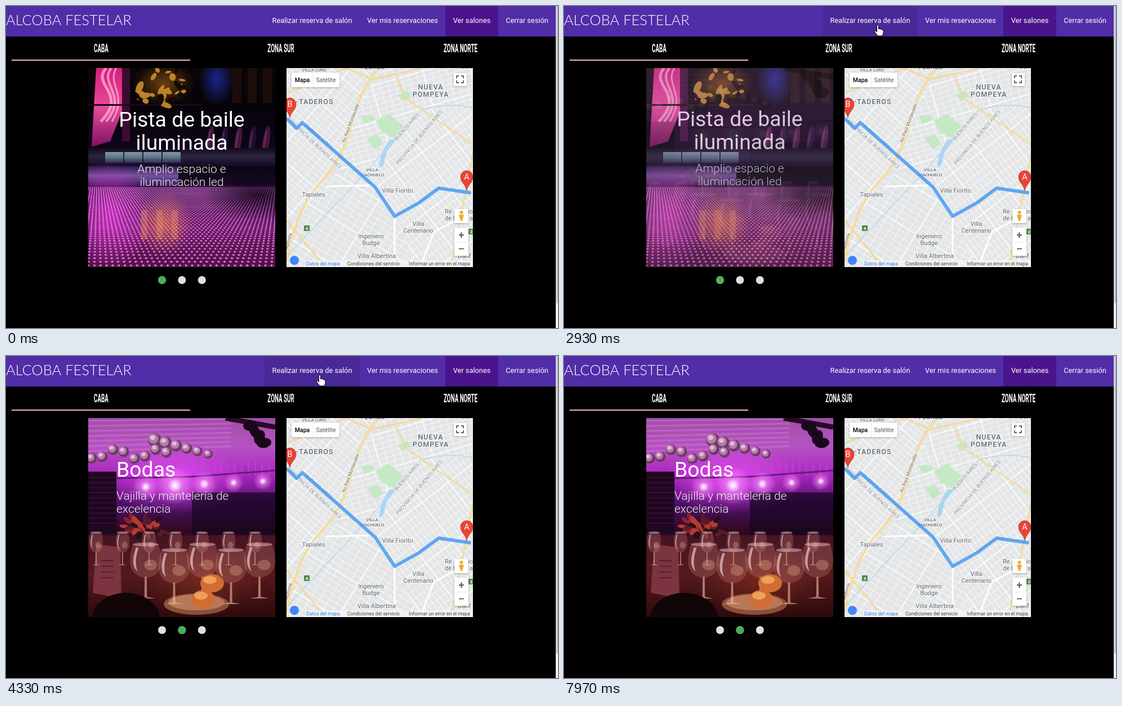
Animation, 980 px wide and 571 px high, one loop 8000 ms. Source, as an HTML page with a canvas:

```html
<!DOCTYPE html>
<html lang="es">
<head>
<meta charset="utf-8">
<title>Salones</title>
<style>
  html, body { margin: 0; width: 100%; height: 100%; overflow: hidden; background: #000; }
  canvas { display: block; }
</style>
</head>
<body>
<canvas id="stage" width="980" height="571"></canvas>
<script>
const W = 980, H = 571, LOOP = 8000;
const ctx = document.getElementById('stage').getContext('2d');
const SLIDE = [146, 110, 332, 353], MAP = [498, 110, 331, 353];
const SWAP = 2898, CAPTION_IN = 3315, FADE = 500;

const clamp = v => Math.max(0, Math.min(1, v));
const lerp = (a, b, p) => a + (b - a) * p;
const outQuad = p => 1 - (1 - p) * (1 - p);
const swing = p => 0.5 - Math.cos(p * Math.PI) / 2;
const roboto = (size, weight = 400) => `${weight} ${size}px Roboto, sans-serif`;
const times = (n, fn) => { for (let i = 0; i < n; i++) fn(i); };
const randomizer = seed => () => (seed = (seed * 16807) % 2147483647) / 2147483647;

// ---- drawing helpers ----
function layer(box, paint) {
  const c = document.createElement('canvas');
  c.width = W; c.height = H;
  const g = c.getContext('2d');
  clipTo(g, box);
  paint(g);
  return c;
}
function clipTo(g, box) { g.beginPath(); g.rect(...box); g.clip(); }
function rect(g, x, y, w, h, color) { g.fillStyle = color; g.fillRect(x, y, w, h); }
function oval(g, x, y, rx, ry, color, turn = 0) {
  g.fillStyle = color;
  g.beginPath(); g.ellipse(x, y, rx, ry, turn, 0, 7); g.fill();
}
function fill(g, path, color) { g.fillStyle = color; g.fill(new Path2D(path)); }
function stroke(g, path, color, width = 1) {
  g.strokeStyle = color; g.lineWidth = width; g.stroke(new Path2D(path));
}
function fade(g, y0, y1, ...colors) {
  const f = g.createLinearGradient(0, y0, 0, y1);
  colors.forEach((c, i) => f.addColorStop(i / (colors.length - 1), c));
  return f;
}
function glow(g, x, y, r, rgb, alpha, squash = 1) {
  g.save();
  g.translate(x, y); g.scale(1, squash);
  const f = g.createRadialGradient(0, 0, 0, 0, 0, r);
  f.addColorStop(0, `rgba(${rgb},${alpha})`);
  f.addColorStop(1, `rgba(${rgb},0)`);
  rect(g, -r, -r, 2 * r, 2 * r, f);
  g.restore();
}
function text(g, str, x, y, font, color, align = 'left') {
  g.font = font; g.fillStyle = color; g.textAlign = align;
  g.fillText(str, x, y);
}

// ---- slide 1: lit dance floor ----
const danceFloor = layer(SLIDE, g => {
  const rnd = randomizer(77);
  rect(g, ...SLIDE, fade(g, 110, 463, '#0c0407', '#06030a', '#0e0518', '#3a0f4c', '#6d1a6c', '#55104a'));
  glow(g, 374, 130, 32, '30,45,170', 0.8, 1.5);
  times(3, i => rect(g, 402 + i * 27, 110, 16, 62, '#1c0d0a'));

  // pink curtain
  fill(g, 'M160 110H206L208 182 185 240 152 250Z', fade(g, 110, 250, '#d61d80', '#ea4a9a', '#7a1260'));
  times(3, i => stroke(g, `M${178 + i * 9} 110C${150 + i * 14} 140 218 155 ${168 + i * 10} 205`, 'rgba(255,190,215,.7)', 5 - i));
  rect(g, 206, 110, 14, 130, '#3a0d30');
  rect(g, 146, 174, 200, 3, '#1e0a12');

  // golden balcony
  glow(g, 280, 138, 55, '170,105,15', 0.6, 0.7);
  times(34, i => oval(g, 234 + rnd() * 94, 112 + rnd() * 64, 3 + rnd() * 8, 2 + rnd() * 4, i % 3 ? '#bb8228' : '#160a04', rnd() * 3));

  // figures behind the benches
  times(5, i => {
    oval(g, 362 + i * 25, 240, 6, 28, i % 2 ? '#1d1030' : '#40183a', 0.15);
    oval(g, 360 + i * 25, 236, 2, 18, 'rgba(150,60,130,.4)', 0.15);
  });

  // benches and their reflections
  rect(g, 146, 252, 332, 30, fade(g, 252, 282, '#120a1c', '#2c2440', '#150c24'));
  times(4, i => rect(g, 176 + i * 34, 259, 32, 19, fade(g, 259, 278, '#7f9ca4', '#5d7388', '#2c3050')));
  rect(g, 146, 284, 160, 34, fade(g, 284, 318, '#2a1a48', '#74539c', '#3a1a56'));
  rect(g, 306, 284, 172, 34, fade(g, 284, 318, '#0a0512', '#1c0c28'));
  glow(g, 185, 370, 75, '225,50,215', 0.75, 1.3);
  glow(g, 280, 385, 50, '230,120,45', 0.7, 1.1);
  times(3, i => rect(g, 240 + i * 27, 362, 11, 52, 'rgba(225,135,70,.4)'));

  // perspective grid of lamps
  for (let z = 0.98, row = 0; z < 3.1; z += 0.034, row++) {
    const gap = 11 / z, y = 254 + 209 / z, shift = 325 + (row % 2) * gap / 2;
    for (let x = shift - Math.floor(190 / gap) * gap; x < 480; x += gap)
      oval(g, x, y, 2.4 / z, 1.8 / z, 'rgba(246,150,228,.78)');
  }
  glow(g, 445, 335, 95, '14,2,20', 0.75, 0.5);
});

// ---- slide 2: wedding tables ----
function discoBall(g, x, y, r) {
  oval(g, x, y, r, r, '#6d3a66');
  oval(g, x - r * 0.2, y - r * 0.2, r * 0.75, r * 0.75, '#b27ba8');
  oval(g, x - r * 0.3, y - r * 0.35, r * 0.4, r * 0.35, '#e8b9dc');
}
function glass(g, x, y, w, h) {
  g.save();
  g.translate(x, y); g.scale(w, h);
  fill(g, 'M-.4 0C-.6 .4-.45 .58 0 .62 .45 .58 .6 .4 .4 0Z', 'rgba(215,140,130,.25)');
  fill(g, 'M-.3 .06C-.44 .3-.4 .42-.25 .5-.35 .36-.3 .2-.22 .06Z', 'rgba(255,225,225,.6)');
  fill(g, 'M-.03 .6H.03L.04 .97 .3 1-.3 1-.04 .97Z', 'rgba(240,185,165,.6)');
  oval(g, 0, 0, 0.4, 0.035, 'rgba(250,205,205,.45)');
  oval(g, 0.15, 0.38, 0.2, 0.1, 'rgba(245,185,155,.3)');
  g.restore();
}
const wedding = layer(SLIDE, g => {
  const rnd = randomizer(31);
  rect(g, ...SLIDE, fade(g, 110, 463, '#a04da6', '#b653c2', '#ab25c0', '#4c0f68', '#30091f', '#451418', '#3a0f10', '#220808'));
  times(7, i => stroke(g, `M146 ${115 + i * 9}L400 ${112 + i * 8}`, 'rgba(225,150,220,.3)', 3));
  glow(g, 300, 218, 125, '240,80,255', 0.8, 0.5);
  rect(g, 146, 205, 50, 110, '#1f0720');
  times(10, i => rect(g, 147, 215 + i * 9, 48, 1, '#45183f'));
  rect(g, 330, 242, 148, 75, 'rgba(22,5,30,.7)');
  times(11, i => rect(g, 345 + i * 12, 188, 3, 24, 'rgba(185,75,215,.5)'));
  stroke(g, 'M196 217L330 214 478 203', '#661e76', 3);

  // lighting rig
  stroke(g, 'M390 110L478 126', '#260c25', 9);
  times(4, i => oval(g, 434 + i * 8, 124 + i * 10, 13, 9, '#180819', i));

  times(6, i => discoBall(g, 264 + i * 19, 149 + i * 5, 12 - i * 0.8));
  times(8, i => discoBall(g, 152 + i * 19, 174 + 9 * Math.sin(i * 1.6 + 1), 9.5));
  times(5, i => {
    const r = 9 + 9 * Math.exp(-((i - 1) ** 2));
    glow(g, 248 + i * 52, 232 - i * 2.5, r * 1.9, '255,150,255', 0.85);
    glow(g, 248 + i * 52, 232 - i * 2.5, r * 0.7, '255,255,255', 1);
  });

  // flowers, card, table
  rect(g, 146, 318, 332, 145, fade(g, 318, 463, '#451323', '#54191d', '#2e0a0a'));
  glow(g, 350, 395, 110, '150,55,35', 0.5, 0.6);
  fill(g, 'M160 334L203 339 205 430 154 420Z', '#7b3440');
  times(4, i => rect(g, 169, 362 + i * 10, 22, 2, '#54202f'));
  times(36, i => {
    const a = rnd() * 6.3, d = rnd();
    oval(g, 243 + Math.cos(a) * d * 42, 304 + Math.sin(a) * d * 23, 5 + rnd() * 8, 3 + rnd() * 4,
      ['#86202f', '#b53a34', '#581b29', '#26101a'][i % 4], a);
  });
  oval(g, 338, 440, 58, 19, '#8a4f38');
  oval(g, 338, 437, 50, 14, '#b87858');
  times(7, i => glass(g, 160 + i * 47, 313, 25, 58));
  times(5, i => glass(g, 248 + i * 50.5, i % 2 ? 344 : 334, 57, 96));
  [[366, 403], [350, 431]].forEach(([x, y]) => {
    oval(g, x, y, 21, 16, '#cf6d32');
    oval(g, x - 4, y - 6, 12, 7, '#efa05c');
  });
  oval(g, 213, 465, 60, 45, '#120507');
});

// ---- map ----
const GRAY = '#626870', SOFT = '#858a90', ROAD = '#716747';
function label(g, str, x, y, size, { turn = 0, weight = 400, color = GRAY, align = 'center', lead = 12 } = {}) {
  g.save();
  g.translate(x, y); g.rotate(turn * Math.PI / 180);
  g.strokeStyle = 'rgba(245,246,246,.9)'; g.lineWidth = 2.5;
  g.font = roboto(size, weight); g.textAlign = align;
  str.split('\n').forEach((row, i) => {
    g.strokeText(row, 0, i * lead);
    text(g, row, 0, i * lead, g.font, color, align);
  });
  g.restore();
}
function streets(g, area, angle, gap) {
  g.save();
  g.clip(new Path2D(area));
  g.translate(664, 286); g.rotate(angle);
  times(2, () => {
    times(60, i => rect(g, -290, (i - 30) * gap, 580, i % 7 ? 1 : 2.4, '#f8f9f9'));
    g.rotate(Math.PI / 2);
    gap *= 1.5;
  });
  g.restore();
}
function pin(g, x, tip, letter) {
  g.save();
  g.translate(x, tip);
  const drop = 'M0 0C-2-11-11-14-11-24A11 11 0 0 1 11-24C11-14 2-11 0 0Z';
  fill(g, drop, '#ea4335');
  stroke(g, drop, '#b3261e', 0.7);
  text(g, letter, 0, -19, roboto(14.5), '#fff', 'center');
  g.restore();
}
function panel(g, x, y, w, h) {
  g.save();
  g.shadowColor = 'rgba(0,0,0,.3)'; g.shadowBlur = 3; g.shadowOffsetY = 1;
  rect(g, x, y, w, h, '#fff');
  g.restore();
}
function drawControls(g) {
  panel(g, 507, 118, 85, 26);
  rect(g, 545, 118, 1, 26, '#e8e8e8');
  text(g, 'Mapa', 526, 134.5, roboto(10.5, 500), '#000', 'center');
  text(g, 'Satélite', 568, 134.5, roboto(10.5), '#565656', 'center');
  panel(g, 795, 119, 23, 23);
  g.save();
  g.translate(806, 130);
  times(4, () => { stroke(g, 'M2.5 6H6V2.5', '#666', 2); g.rotate(Math.PI / 2); });
  g.restore();
  panel(g, 796, 360, 25, 25);
  oval(g, 808.5, 366, 3, 3, '#e7ae32');
  fill(g, 'M804 370H813L810 381H807Z', '#e7ae32');
  panel(g, 796, 393, 25, 50);
  rect(g, 800, 418, 17, 1, '#e6e6e6');
  text(g, '+', 808.5, 412, roboto(18, 700), '#666', 'center');
  rect(g, 804, 429.5, 9, 2, '#666');
  oval(g, 512, 451, 8, 8, '#4285f4');
  rect(g, 531, 451, 299, 12, 'rgba(245,245,245,.75)');
  text(g, 'Datos del mapa', 533, 460, roboto(8.6), '#2f83e5');
  text(g, 'Condiciones del servicio', 606, 460, roboto(8.6), '#444');
  text(g, 'Informar un error en el mapa', 824, 460, roboto(8.6), '#444', 'right');
}
const map = layer(MAP, g => {
  g.lineJoin = g.lineCap = 'round';
  rect(g, ...MAP, '#e3e5e6');
  streets(g, 'M498 110H665L570 300 498 380Z', 0.72, 8.5);
  streets(g, 'M665 110H829V180H735L640 290H570Z', -0.28, 9);
  streets(g, 'M829 180H735L640 290 735 463H829Z', 0.92, 8.5);
  streets(g, 'M640 290L735 463H498V380L570 300Z', 0.55, 10);

  fill(g, 'M657 204L680 191 706 213 690 235 668 224ZM641 234L660 228 670 245 654 254ZM695 158L712 150 719 160 704 168ZM630 194H652L655 201 636 209Z', '#c5e8c5');
  fill(g, 'M680 238L694 235 676 258 670 282 662 287 666 262Z', '#a9d5f5');
  stroke(g, 'M829 181Q790 170 736 184L640 293 498 445', '#b9d9ed', 1.8);
  stroke(g, 'M690 463V373L650 318 570 320M735 463L760 400 829 365', '#fff', 3);
  const minor = 'M498 155L604 110 650 130 738 110M694 128L710 164 829 246M829 263L790 463M498 380L567 463';
  const highway = 'M662 110C600 180 630 235 560 310Q515 360 498 452';
  stroke(g, minor, '#efc97b', 2.6);
  stroke(g, highway, '#efc97b', 4);
  stroke(g, minor, '#f9dfa0', 1.6);
  stroke(g, highway, '#f9dfa0', 2.8);

  const caps = { weight: 500 }, left = { align: 'left' }, right = { align: 'right' };
  label(g, 'VILLA LURO', 547, 116, 8, caps);
  label(g, 'FLORES', 651, 112, 12, caps);
  label(g, 'Barr', 829, 111, 11, right);
  g.letterSpacing = '1px';
  label(g, 'NUEVA\nPOMPEYA', 754, 148, 12.5, { weight: 500, lead: 13 });
  label(g, '-TADEROS', 515, 174, 12.5, { weight: 500, align: 'left' });
  g.letterSpacing = '0px';
  label(g, 'PROVINCIA DE BUENOS AIRES', 547, 247, 9, { turn: 43, color: SOFT });
  label(g, 'BUENOS AIRES', 553, 234, 9, { turn: 41, color: SOFT });
  label(g, 'BUENOS AIRES', 714, 216, 9, { turn: -49, color: SOFT });
  label(g, 'PROVINCIA DE BUENOS AIRES', 736, 235, 9, { turn: -50, color: SOFT });
  label(g, 'Au Raúl Montevalle', 614, 209, 8.5, { turn: -69, color: ROAD });
  label(g, 'Autovía', 504, 418, 9, { turn: -75, color: ROAD });
  label(g, 'VILLA\nRIACHUELO', 650, 293, 8, { weight: 500, lead: 9 });
  label(g, 'Villa Fiorito', 695, 331, 11);
  label(g, 'Tapiales', 546, 338, 11);
  label(g, 'Villa\nCentenario', 732, 390, 11);
  label(g, 'Ingeniero\nBudge', 648, 412, 11);
  label(g, 'Villa Albertina', 658, 447, 11);
  label(g, 'Banf', 802, 447, 11.5, left);
  label(g, 'Re\nde l', 779, 368, 11, left);
  label(g, 'io\na', 829, 368, 11, right);
  [[529, 389, '4'], [821, 395, '2']].forEach(([x, y, n]) => {
    rect(g, x, y, 10, 10, '#54884d');
    text(g, n, x + 5, y + 8, roboto(8, 700), '#fff', 'center');
  });

  stroke(g, 'M500 201L516 217 526 207 655 321 690 373 733 349 768 323 823 331', 'rgba(72,155,243,.85)', 6);
  pin(g, 504, 198, 'B');
  pin(g, 818, 327, 'A');
  drawControls(g);
});

// ---- pointer: rests at each stop, glides between them ----
const ENTRY = { x: 994, y: 100 };
const MOVES = [
  { at: 60, end: 1250, x: 698, y: 28, ease: outQuad },
  { at: 1720, end: 2350, x: 557, y: 33, ease: swing },
  { at: 4350, end: 4950, x: 672, y: 37, ease: swing },
  { at: 5400, end: 6350, x: 822, y: 35, ease: swing },
  { at: 6880, end: 7400, x: 994, y: 110, ease: swing }
];
function pointer(t) {
  return MOVES.reduce((pos, m) => {
    const p = m.ease(clamp((t - m.at) / (m.end - m.at)));
    return { x: lerp(pos.x, m.x, p), y: lerp(pos.y, m.y, p) };
  }, ENTRY);
}
const HAND = new Path2D('M-1.5 1.5Q0-.5 1.5 1.5V8L3 7.2Q4.6 6.8 5 8.5L6 8Q7.6 8 7.8 9.5Q10 9 10 11V15Q9 18 8 20H0L-5 13.5Q-6.6 11-4.5 10.7L-1.5 13Z');
const ARROW = new Path2D('M0 0V16L3.8 12.5L6.3 18.3L8.8 17.2L6.3 11.6H11.3Z');
const inside = (pos, left, right) => pos.y < 54 && pos.x >= left && pos.x < right;
function drawPointer(pos) {
  const shape = inside(pos, 459, 976) ? HAND : ARROW;
  ctx.save();
  ctx.translate(Math.round(pos.x), Math.round(pos.y));
  ctx.fillStyle = '#fff'; ctx.strokeStyle = '#000'; ctx.lineWidth = 1;
  ctx.fill(shape); ctx.stroke(shape);
  ctx.restore();
}

// ---- page ----
const MENU = [[459, 628, 'Realizar reserva de salón'], [628, 780, 'Ver mis reservaciones'], [780, 874, 'Ver salones'], [874, 976, 'Cerrar sesión']];
function hoverAmount(t, left, right) {
  let hits = 0;
  times(15, i => { hits += inside(pointer(t - i * 20), left, right); });
  return hits / 15;
}
function drawHeader(t) {
  rect(ctx, 0, 0, 976, 54, '#512da8');
  text(ctx, 'ALCOBA FESTELAR', 0, 34, '300 25.5px Lato, sans-serif', '#fff');
  MENU.forEach(([left, right, name], i) => {
    if (i === 2) rect(ctx, left, 0, right - left, 54, '#4a148c');
    rect(ctx, left, 0, right - left, 54, `rgba(0,0,0,${0.1 * hoverAmount(t, left, right)})`);
    text(ctx, name, (left + right) / 2, 30, roboto(12.8), '#fff', 'center');
  });
}
function drawTabs() {
  ctx.save();
  ctx.scale(0.5, 1); // condensed lettering
  ['CABA', 'ZONA SUR', 'ZONA NORTE'].forEach((name, i) =>
    text(ctx, name, 2 * (169 + i * 319), 82, roboto(19.6, 700), '#fff', 'center'));
  ctx.restore();
  rect(ctx, 10, 95, 317, 2, '#f6b2b5');
}
function caption(title, body, x, align) {
  title.forEach((row, i) => text(ctx, row, x, 214 + i * 41, roboto(37.4), '#fff', align));
  body.forEach((row, i) => text(ctx, row, x, 214 + title.length * 41 + i * 23, roboto(21, 300), '#eee', align));
}
function drawSlider(t) {
  const p = clamp((t - SWAP) / FADE), mix = outQuad(p), gone = swing(p);
  const come = outQuad(clamp((t - CAPTION_IN) / FADE));
  ctx.save();
  clipTo(ctx, SLIDE);
  rect(ctx, ...SLIDE, '#9e9e9e');
  ctx.globalAlpha = 1 - mix;
  ctx.drawImage(danceFloor, 0, 0);
  ctx.globalAlpha = (1 - mix) * (1 - gone);
  ctx.translate(0, -100 * gone);
  caption(['Pista de baile', 'iluminada'], ['Amplio espacio e', 'ilumincación led'], 312, 'center');
  ctx.translate(0, 100 * gone);
  ctx.globalAlpha = mix;
  ctx.drawImage(wedding, 0, 0);
  ctx.globalAlpha = mix * come;
  ctx.translate(-100 * (1 - come), 0);
  caption(['Bodas'], ['Vajilla y mantelería de', 'excelencia'], 196, 'left');
  ctx.restore();
}
function drawDots(t) {
  const on = swing(clamp((t - SWAP) / 300));
  [1 - on, on, 0].forEach((a, i) => {
    oval(ctx, 277 + i * 35.4, 486, 7, 7, '#e0e0e0');
    oval(ctx, 277 + i * 35.4, 486, 7, 7, `rgba(76,175,80,${a})`);
  });
}
function draw(t) {
  const pos = pointer(t);
  rect(ctx, 0, 0, W, H, '#000');
  drawHeader(t);
  drawTabs();
  drawSlider(t);
  drawDots(t);
  ctx.drawImage(map, 0, 0);
  rect(ctx, 976, 0, 4, H, '#f1f1f1');
  rect(ctx, 977, 0, 3, 527, '#c1c1c1');
  drawPointer(pos);
}

const start = performance.now();
function tick() {
  draw((performance.now() - start) % LOOP);
  requestAnimationFrame(tick);
}
tick();
</script>
</body>
</html>
```
